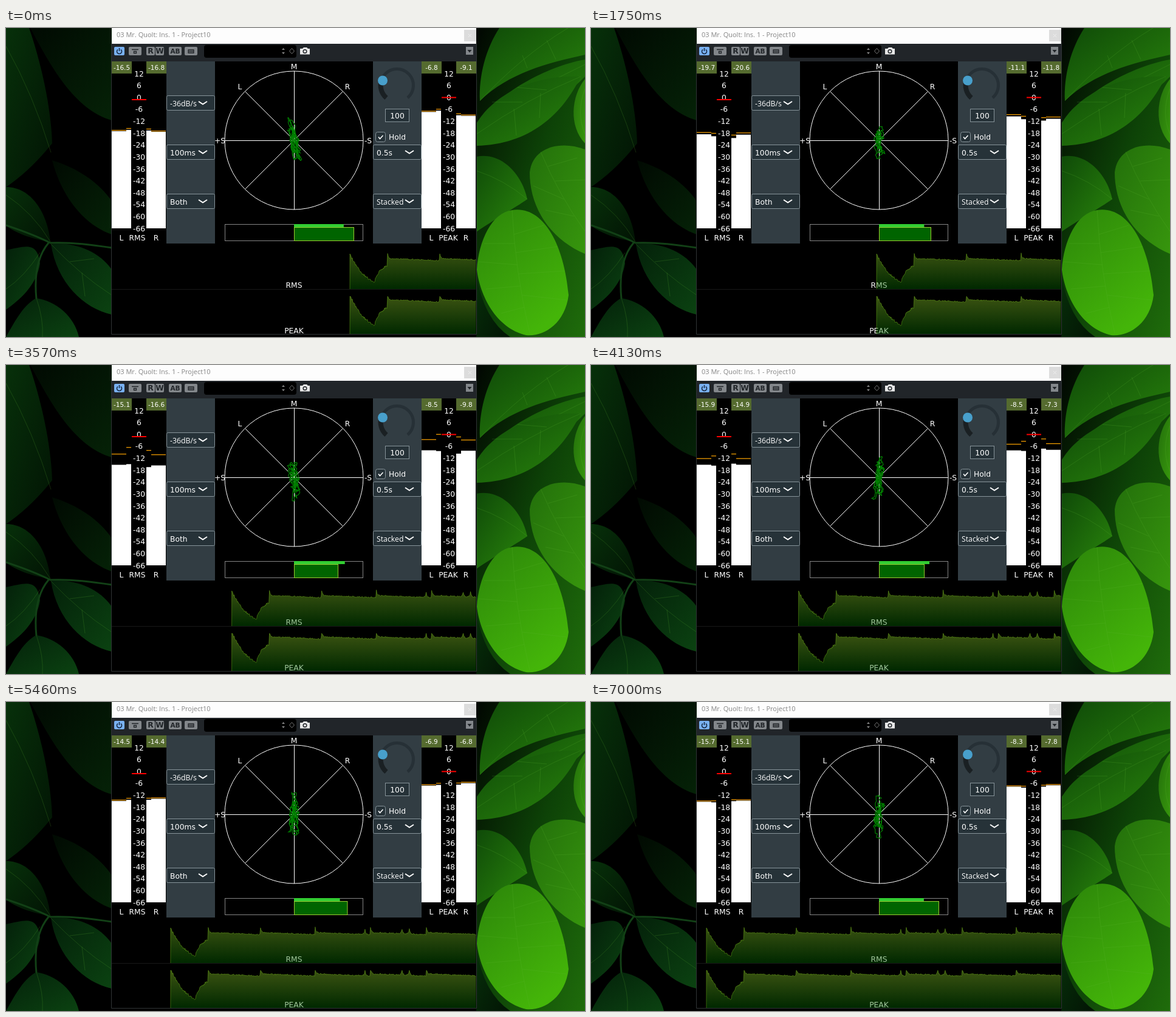
An HTML page for the animation above (7.07 s loop, 953 by 509 pixels).

```html
<!DOCTYPE html>
<html lang="en">
<head>
<meta charset="utf-8">
<title>Level meter</title>
<style>
html, body { margin: 0; width: 100%; height: 100%; overflow: hidden; background: #000; }
svg { display: block; width: 953px; height: 509px; }
text { font: 12.3px "DejaVu Sans", sans-serif; fill: #fff; }
.mid { text-anchor: middle; }
.badge { font-size: 10.5px; text-anchor: middle; }
.title { font: 11px "Open Sans", sans-serif; fill: #858585; }
.narrow { font: 12.3px "Open Sans", sans-serif; }
.icon { font-weight: bold; text-anchor: middle; fill: #212529; }
.box { fill: #263238; stroke: #87949a; }
.line { fill: none; stroke: #fff; }
.vein { fill: none; stroke: #62b832; stroke-opacity: .22; }
</style>
</head>
<body>
<svg id="stage" viewBox="0 0 953 509">
  <defs>
    <linearGradient id="dim" x2="1" y2="1"><stop stop-color="#010a02"/><stop offset="1" stop-color="#052207"/></linearGradient>
    <linearGradient id="dark" x2="1" y2="1"><stop stop-color="#07300a"/><stop offset="1" stop-color="#021404"/></linearGradient>
    <linearGradient id="low" x2="1" y2="1"><stop stop-color="#04210a"/><stop offset="1" stop-color="#0b4211"/></linearGradient>
    <linearGradient id="back" x2="1" y2="1"><stop stop-color="#010601"/><stop offset=".5" stop-color="#0d4207"/><stop offset="1" stop-color="#1f6c0b"/></linearGradient>
    <linearGradient id="mid" x2="1" y2="1"><stop stop-color="#0f4a08"/><stop offset="1" stop-color="#2a860c"/></linearGradient>
    <linearGradient id="lit" x2="1" y2="1"><stop stop-color="#236f0b"/><stop offset="1" stop-color="#37960d"/></linearGradient>
    <linearGradient id="bright" x2=".6" y2="1"><stop stop-color="#2c850a"/><stop offset="1" stop-color="#44b509"/></linearGradient>
    <linearGradient id="waveFill" gradientUnits="userSpaceOnUse" x1="0" y1="-62" x2="0" y2="0">
      <stop stop-color="#94d02c"/><stop offset="1" stop-color="#006400"/>
    </linearGradient>
    <clipPath id="window"><path d="M174 355H773.5V505H174Z"/></clipPath>
  </defs>
  <rect width="953" height="509"/>
  <g id="leaves"></g>
  <g id="panel"></g>
  <g id="bars"></g>
  <g id="scales"></g>
  <g id="scope"></g>
  <g id="waves" clip-path="url(#window)"></g>
  <path d="M173.5 26V504.500H774.5V26" fill="none" stroke="#303436"/>
</svg>
<script>
const FRAME = 70, FRAMES = 101, EDGE = 774;
const KEYS = [0, 1750, 2800, 3570, 4690, 6230, 7000];
const $ = id => document.getElementById(id);

function set(el, attrs) {
  for (const k in attrs) el.setAttribute(k, attrs[k]);
}
function add(parent, tag, attrs, text) {
  const el = document.createElementNS(parent.namespaceURI, tag);
  set(el, attrs);
  if (text !== undefined) el.textContent = text;
  return parent.appendChild(el);
}
const rect = (p, x, y, width, height, fill, more) => add(p, 'rect', { x, y, width, height, fill, ...more });
const path = (p, d, more) => add(p, 'path', { d, ...more });
const label = (p, x, y, s, cls = 'mid') => add(p, 'text', { x, y, class: cls }, s);

function hash(n) {
  const s = Math.sin(n * 127.1 + 11.7) * 43758.5453;
  return s - Math.floor(s);
}

// Key values joined by straight runs, with a flutter that peaks midway
function track(vals, t, seed) {
  t = Math.max(0, Math.min(7000, t));
  let i = 0;
  while (i < KEYS.length - 2 && t >= KEYS[i + 1]) i++;
  const f = (t - KEYS[i]) / (KEYS[i + 1] - KEYS[i]);
  const flutter = Math.sin(f * Math.PI) * (hash(t / FRAME + seed) - .5) * 1.6;
  return vals[i] + (vals[i + 1] - vals[i]) * f + flutter;
}

function buildLeaves() {
  const g = $('leaves');
  const leaf = (fill, d, veins) => {
    path(g, d, { fill: `url(#${fill})` });
    if (veins) path(g, veins, { class: 'vein' });
  };
  leaf('dim', 'M40 0C72 60 112 135 174 152V0Z');
  leaf('dark', 'M0 0H38C58 58 74 130 76 190Q40 235 0 262Z', 'M0 30Q45 110 74 205');
  leaf('dim', 'M76 218C110 228 150 250 174 285V340C130 325 92 280 76 218Z');
  leaf('dark', 'M0 262C42 262 68 305 73 352C42 348 12 336 0 325Z', 'M0 275Q45 305 73 352');
  leaf('low', 'M74 356C110 352 152 366 174 398V472C128 462 84 420 74 356Z', 'M74 356Q120 405 174 440M105 385L145 380M125 403L130 442');
  leaf('low', 'M0 366C30 360 52 350 56 388C50 425 22 448 0 464Z', 'M56 370Q30 410 0 430');
  leaf('low', 'M50 445C82 450 112 474 120 509H0C16 480 30 455 50 445Z', 'M50 445Q62 480 60 509');
  path(g, 'M0 325Q45 340 73 354Q110 352 174 362M70 354Q44 385 50 446', { fill: 'none', stroke: '#124016', 'stroke-width': 3 });

  leaf('back', 'M774 0H953V509H774Z');
  leaf('mid', 'M812 0H953V44C890 58 828 74 780 120C778 78 790 34 812 0Z', 'M925 0Q850 45 780 120M890 20L905 52M850 45L858 66');
  leaf('mid', 'M953 52C892 62 808 108 774 158V182C840 160 915 120 953 80Z', 'M953 60Q855 105 774 170');
  leaf('mid', 'M774 158C800 112 866 76 946 80C916 142 862 192 774 194Z', 'M946 80Q860 115 774 175M890 102L842 98M850 122L800 122M880 107L878 148M836 133L840 177');
  leaf('lit', 'M953 84C930 112 926 162 953 190Z', 'M953 100Q938 140 953 175');
  leaf('mid', 'M774 212C812 204 848 236 858 282C838 296 800 318 774 336Z', 'M774 235Q820 250 858 282');
  leaf('lit', 'M953 200C910 184 866 198 862 238C862 300 900 350 953 372Z', 'M880 204Q910 275 953 335M892 228L940 214M904 252L953 250M918 282L868 260M935 310L888 300');
  leaf('dark', 'M774 405Q786 480 830 509H774Z');
  leaf('bright', 'M833 300C882 292 918 352 926 440C920 488 884 509 856 506C806 494 780 440 775 398C778 350 800 304 833 300Z',
    'M833 300Q838 400 862 503M836 340L885 325M839 370L908 360M844 405L920 400M850 440L922 448M837 355L787 355M841 390L778 385M847 425L790 430M853 460L815 470');
}

function combo(p, x, y, s, cls = '') {
  rect(p, x + .5, y + .5, 79, 24, '', { rx: 2, class: 'box' });
  label(p, x + 6, y + 17.5, s, cls);
  path(p, `M${x + 53} ${y + 10}l7 4.500l7 -4.500`, { class: 'line', 'stroke-width': 2 });
}

function buildToolbar(p) {
  const ink = '#212529', grey = '#83878b';
  rect(p, 174, 26, 600, 29, ink);
  const button = (x, w, fill = grey) => rect(p, x, 31, w, 14, fill, { rx: 2 });
  button(178, 17, '#79b1f2');
  path(p, 'M184 35.500a4 4 0 1 0 5 0M186.500 33v5', { fill: 'none', stroke: '#14253d', 'stroke-width': 1.5 });
  button(202, 21); button(231, 14); button(246, 14); button(268, 21); button(294, 21);
  path(p, 'M207 35.500h11M210.500 38.500h4v3h-4ZM300 36h9v5h-9ZM300 38.500h9', { fill: 'none', stroke: ink, 'stroke-width': 1.3 });
  label(p, 238, 42, 'R', 'icon');
  label(p, 253, 42, 'W', 'icon');
  label(p, 278.5, 41.5, 'AB', 'icon badge');
  rect(p, 326, 28, 152, 21, '#000', { rx: 4 });
  path(p, 'M454 36l2.500 -3l2.500 3ZM454 40l2.500 3l2.500 -3Z', { fill: '#888' });
  path(p, 'M470.500 33.500l4 4.500l-4 4.500l-4 -4.500Z', { fill: 'none', stroke: '#777' });
  path(p, 'M484 34h4l2 -2h5l2 2h3v9.500h-16Z', { fill: '#e8e8e8' });
  add(p, 'circle', { cx: 492, cy: 38.5, r: 2.8, fill: '#e8e8e8', stroke: ink, 'stroke-width': 1.5 });
  rect(p, 757, 31, 12, 13, grey);
  path(p, 'M759.500 36h7l-3.500 4.500Z', { fill: ink });
}

function buildPanel() {
  const p = $('panel');
  rect(p, 174, 0, 600, 505, '#000');
  rect(p, 174, 0, 600, 26, '#fdfdfd');
  label(p, 182, 15, '03 Mr. Quolt: Ins. 1 - Project10', 'title');
  rect(p, 754, 3, 20, 19, '#dcdcdc');
  path(p, 'M761 10l5 5m0 -5l-5 5', { stroke: '#eee' });
  buildToolbar(p);

  rect(p, 264, 55, 80, 300, '#323d43');
  rect(p, 604, 55, 80, 300, '#323d43');
  combo(p, 264, 111, '-36dB/s', 'narrow');
  combo(p, 264, 192, '100ms');
  combo(p, 264, 273, 'Both');
  combo(p, 604, 192, '0.5s');
  combo(p, 604, 273, 'Stacked', 'narrow');

  path(p, 'M626 115A27 27 0 1 1 661 115', { fill: 'none', stroke: '#263036', 'stroke-width': 5 });
  path(p, 'M626 115A27 27 0 0 1 618 86', { fill: 'none', stroke: '#1a2023', 'stroke-width': 8 });
  add(p, 'circle', { cx: 620, cy: 86.5, r: 8, fill: '#48a0cc' });
  rect(p, 624.5, 133.5, 39, 21, '', { class: 'box' });
  label(p, 644, 149, '100');
  rect(p, 608.5, 171.5, 16, 16, '', { rx: 3, class: 'box' });
  path(p, 'M613 179.500l2.500 3l5 -5.500', { class: 'line', 'stroke-width': 1.6 });
  label(p, 630, 184, 'Hold', '');

  add(p, 'circle', { cx: 474, cy: 185, r: 114, class: 'line' });
  path(p, 'M474.500 71V299M360 185.500H588M393.500 104.500L554.500 265.500M554.500 104.500L393.500 265.500', { class: 'line' });
  label(p, 474, 67.5, 'M');
  label(p, 385, 101, 'L');
  label(p, 562, 101, 'R');
  label(p, 352, 190, '+S');
  label(p, 596, 190, '-S');
  rect(p, 360.5, 323.5, 227, 27, 'none', { stroke: '#858585' });
}

// Each channel has a narrow fast bar and a wide averaged one; levels in dB below zero
const channel = (fastX, slowX, numX, keys) => ({ fastX, slowX, numX, keys });
const channels = [
  channel(198, 174, 190.5, [16.5, 19.7, 15.5, 15.1, 15.7, 14, 15.7]),
  channel(231, 239, 247.5, [16.8, 20.6, 16.1, 16.6, 14.3, 13.9, 15.1]),
  channel(708, 684, 700.5, [6.8, 11.1, 6.6, 8.5, 7.8, 6, 8.3]),
  channel(741, 749, 757.5, [9.1, 11.8, 7.3, 9.8, 5.8, 6.3, 7.8])
];
const decibels = (i, t) => track(channels[i].keys, t, i * 300);

function buildMeters() {
  const g = $('bars'), s = $('scales');
  const bar = (x, w) => ({ fill: rect(g, x, 0, w, 0, '#fff'), mark: rect(g, x, 0, w, 1.2, '#ffa500') });
  for (const c of channels) {
    c.fast = bar(c.fastX, 8);
    c.slow = bar(c.slowX, 24);
    rect(s, c.numX - 16.5, 55, 33, 20, '#556b2f');
    c.num = label(s, c.numX, 69, '', 'badge');
  }
  for (const [x, zero, name, nameX] of [[219, 118, 'RMS', 216], [729, 114.5, 'PEAK', 728]]) {
    for (let db = 12; db >= -66; db -= 6) label(s, x, 118.8 - db * 3.27, db);
    path(s, `M${x - 12} ${zero}h24`, { stroke: '#f00', 'stroke-width': 2 });
    label(s, nameX, 350, name);
    label(s, x - 29, 350, 'L');
    label(s, x + 28, 350, 'R');
  }
}

function drawMeters(t) {
  const lift = 3 + 27 * Math.exp(-(((t - 3300) / 1000) ** 2));
  const place = (bar, db, rise) => {
    const y = 114 + db * 3.265;
    set(bar.fill, { y, height: 330 - y });
    set(bar.mark, { y: y - rise });
  };
  channels.forEach((c, i) => {
    const db = decibels(i, t);
    c.num.textContent = (-db).toFixed(1);
    place(c.fast, db, lift);
    place(c.slow, (decibels(i, t - 500) + decibels(i, t + 500)) / 2, lift * .65);
  });
}

let trace, balance, spread;
function buildScope() {
  const g = $('scope');
  trace = path(g, '', { fill: 'none', stroke: '#008000', 'stroke-width': 1.2 });
  spread = rect(g, 474, 323, 0, 5, '#32cd32');
  balance = rect(g, 474.5, 328.5, 0, 22, '#006400', { stroke: '#9acd32' });
}

// The cloud grows with the peak level and leans to the louder side
function drawScope(t, n) {
  const left = decibels(2, t), right = decibels(3, t);
  const reach = 89 - 6.6 * (Math.min(left, right) - 6);
  const lean = (left - right) * .07;
  const r = k => hash(n * 13 + k) * 6.283;
  const turns = 6 + r(0);
  let d = '';
  for (let i = 0; i < 190; i++) {
    const u = i / 190 * 6.283;
    const v = .65 * Math.sin(turns * u + r(1)) * (.65 + .35 * Math.sin(u + r(2))) + .35 * Math.sin(1.7 * u + r(3));
    const y = -v * reach * (v > 0 ? .45 : .55);
    const x = 7 * (.6 * Math.sin(turns * 1.31 * u + r(4)) + .4 * Math.sin(3.1 * u + r(5)))
      + (hash(n * 300 + i) - .5) * 5 - lean * y;
    d += `${i ? 'L' : 'M'}${(474 + x).toFixed(1)} ${(185 + y + (hash(n * 500 + i) - .5) * 4).toFixed(1)}`;
  }
  set(trace, { d });
  set(balance, { width: 85 + 13 * Math.cos(t / 7000 * 6.283) });
  set(spread, { width: 72 + 14 * hash(n) });
}

const BEATS = [62, 148, 238, 329, 421, 510];
const ACCENTS = [320, 381, 393];

// Height of the history curve, x pixels after its start
function level(x) {
  const noise = hash(x) - .5;
  if (x < 41) return 58 * Math.exp(-x / 25) + (x && noise * 4);
  if (x < 62) return 12 + 6 * Math.sqrt(x - 41) + noise * 4;
  const age = x - BEATS.findLast(b => b <= x);
  const accents = ACCENTS.reduce((sum, a) => sum + Math.exp(-Math.abs(x - a) / 1.3), 0);
  return 50.5 - age * .04 + noise * 2 + 8 * (Math.exp(-age / 1.5) + accents);
}

let curves;
function buildWaves() {
  const g = $('waves');
  path(g, 'M174 430.500H774', { stroke: '#181818' });
  label(g, 474, 428, 'RMS');
  label(g, 474, 503, 'PEAK');
  curves = [[430, h => h], [504, h => Math.min(62, h * 1.08 + 2)]].map(([base, shape]) => {
    let d = 'M0 0';
    for (let x = 0; x <= 590; x++) d += `L${x} ${(-shape(level(x))).toFixed(1)}`;
    const el = add(g, 'g');
    path(el, d + 'V0Z', { fill: 'url(#waveFill)', opacity: .4 });
    path(el, d, { fill: 'none', stroke: '#86d020', opacity: .4 });
    return { el, base };
  });
}

// The history slides left, slowing slightly
function drawWaves(t) {
  const x = 566 - .0552 * t + 2.1e-7 * t * t;
  for (const c of curves) set(c.el, { transform: `translate(${x.toFixed(1)} ${c.base})` });
}

function draw(ms) {
  const n = Math.floor(ms / FRAME) % FRAMES, t = n * FRAME;
  drawMeters(t);
  drawScope(t, n);
  drawWaves(t);
}

buildLeaves();
buildPanel();
buildMeters();
buildScope();
buildWaves();
const start = performance.now();
(function loop() {
  draw(Math.max(0, performance.now() - start));
  requestAnimationFrame(loop);
})();
</script>
</body>
</html>
```
